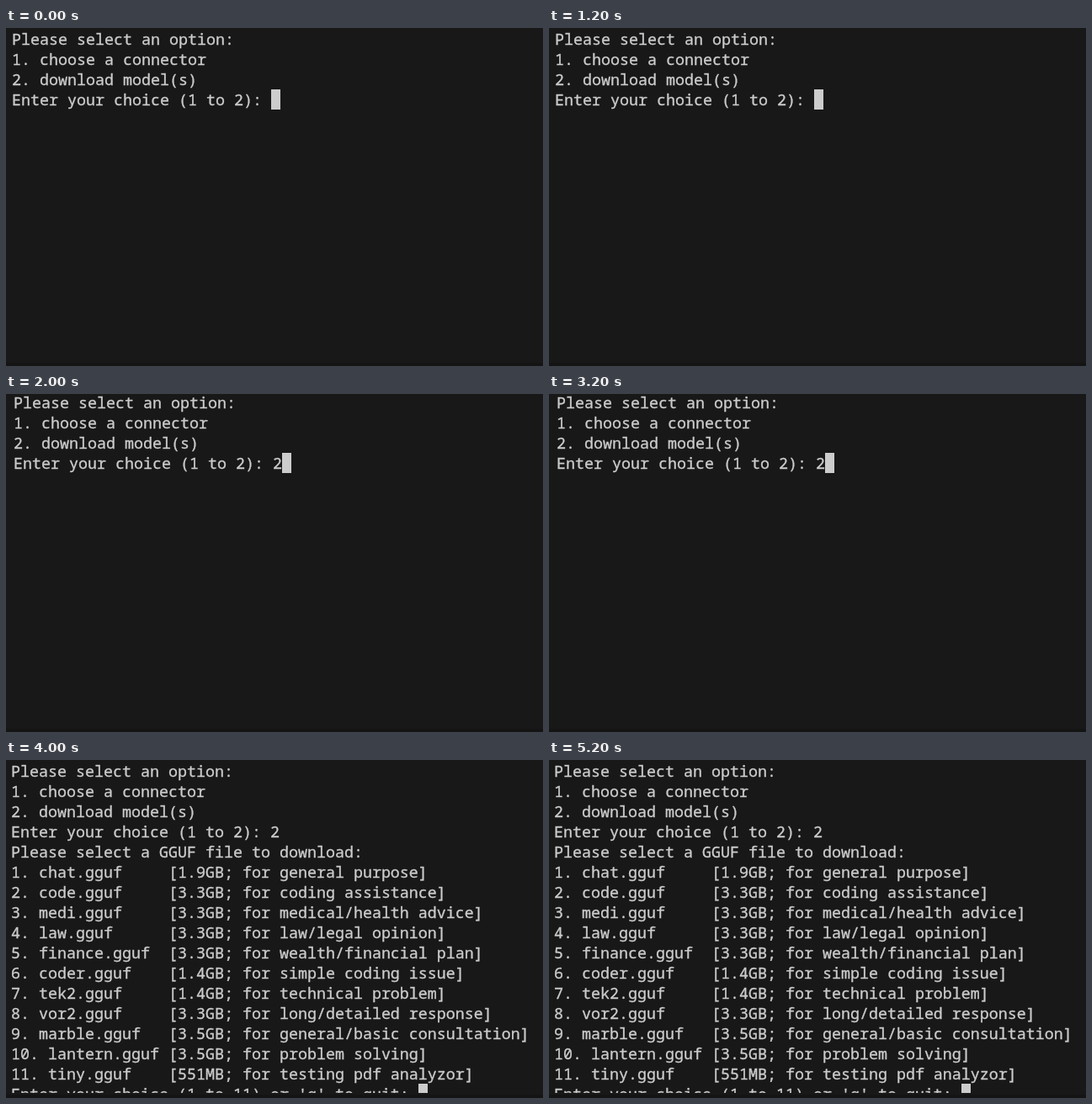
Write an HTML page that moves like this. It is 638x402 px and loops after 6000 ms.

```html
<!DOCTYPE html>
<html lang="en">
<head>
<meta charset="utf-8">
<title>Terminal menu</title>
<style>
  html, body { margin: 0; width: 100%; height: 100%; overflow: hidden; background: #141414; }
  #screen { position: relative; height: 398px; overflow: hidden; background: #181818; }
  #clip { position: absolute; inset: 0 0 2px; overflow: hidden; }
  #output {
    position: absolute; margin: 0; color: #ccc;
    font: 18.333px/24px "Noto Sans Mono", "DejaVu Sans Mono", monospace;
    font-variant-ligatures: none;
    -webkit-text-stroke: 0.35px #ccc;
  }
  .cursor { display: inline-block; width: 11px; height: 24px; vertical-align: top; background: #ccc; }
</style>
</head>
<body>
<div id="screen"><div id="clip"><pre id="output"></pre></div></div>
<script>
const STEP = 2000;
const cursor = '<span class="cursor"></span>';
const menu = `Please select an option:
1. choose a connector
2. download model(s)
Enter your choice (1 to 2): `;

const files = [
  ['chat', '1.9GB', 'general purpose'],
  ['code', '3.3GB', 'coding assistance'],
  ['medi', '3.3GB', 'medical/health advice'],
  ['law', '3.3GB', 'law/legal opinion'],
  ['finance', '3.3GB', 'wealth/financial plan'],
  ['coder', '1.4GB', 'simple coding issue'],
  ['tek2', '1.4GB', 'technical problem'],
  ['vor2', '3.3GB', 'long/detailed response'],
  ['marble', '3.5GB', 'general/basic consultation'],
  ['lantern', '3.5GB', 'problem solving'],
  ['tiny', '551MB', 'testing pdf analyzor'],
];
const fileList = files.map(([name, size, use], i) =>
  `${i + 1}. ${name}.gguf`.padEnd(17) + `[${size}; for ${use}]`).join('\n');

const scenes = [
  { x: 7, y: 1, text: menu },
  { x: 9, y: -2, text: menu + '2' },
  { x: 6, y: 1, text: `${menu}2
Please select a GGUF file to download:
${fileList}
Enter your choice (1 to 11) or 'q' to quit: ` },
];

const output = document.getElementById('output');
let shown = -1;

function draw() {
  const index = Math.floor(performance.now() / STEP) % scenes.length;
  if (index !== shown) {
    const { x, y, text } = scenes[index];
    output.style.left = x + 'px';
    output.style.top = y + 'px';
    output.innerHTML = text + cursor;
    shown = index;
  }
  requestAnimationFrame(draw);
}
draw();
</script>
</body>
</html>
```
